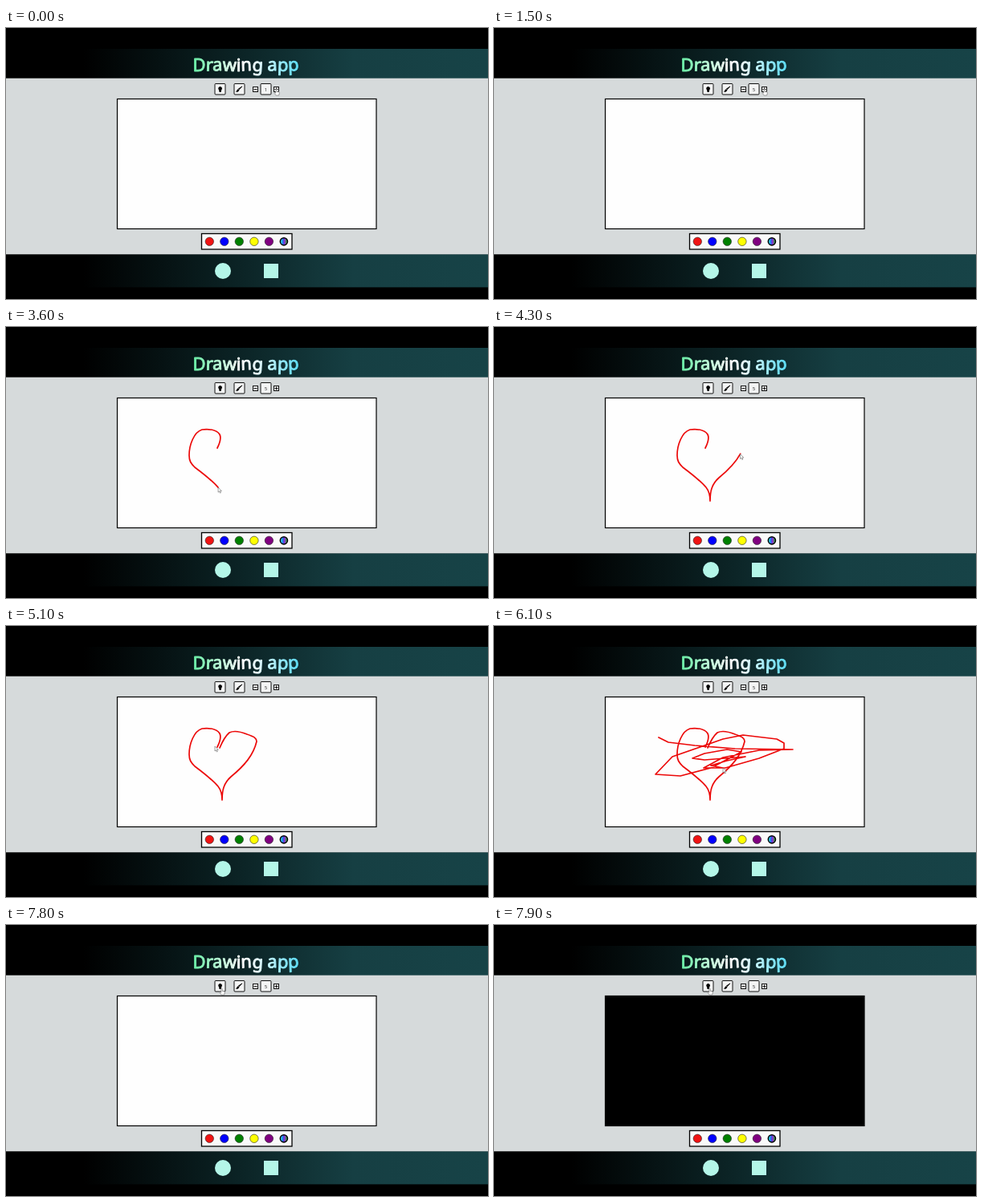
These frames come from a looping animation (600 by 338 pixels, 8000 ms). An HTML page:

```html
<!DOCTYPE html>
<html lang="en">
<head>
<meta charset="utf-8">
<title>Drawing app</title>
<style>
  html, body { margin: 0; width: 100%; height: 100%; overflow: hidden; background: #000; }
  svg { display: block; width: 100%; height: 100%; }
  .title { font: 500 22px "Noto Sans", sans-serif; stroke-width: .9; stroke-linejoin: round; }
  .size { font: 6px "Noto Sans", sans-serif; text-anchor: middle; fill: #333; }
  .button { fill: #f3f4f4; stroke: #111; }
  .ink { fill: none; stroke: #ec0808; stroke-width: 1.7; stroke-linecap: round; stroke-linejoin: round; }
  .dots circle { stroke: #222; stroke-width: .6; }
  .cursor { fill: #fff; stroke: #666; stroke-width: .6; stroke-linejoin: round; }
</style>
</head>
<body>
<svg viewBox="0 0 600 338">
  <defs>
    <linearGradient id="bar">
      <stop offset=".16" stop-color="#000"/>
      <stop offset=".5" stop-color="#0c2527"/>
      <stop offset=".72" stop-color="#163f43"/>
      <stop offset="1" stop-color="#174347"/>
    </linearGradient>
    <radialGradient id="page" gradientUnits="userSpaceOnUse" r="1"
      gradientTransform="translate(300 172) scale(260 420)">
      <stop offset="0" stop-color="#f8f8f8"/>
      <stop offset=".35" stop-color="#efefef"/>
      <stop offset=".7" stop-color="#e2e4e4"/>
      <stop offset="1" stop-color="#d6dadb"/>
    </radialGradient>
    <linearGradient id="shine" gradientUnits="userSpaceOnUse" x1="233" x2="367">
      <stop offset="0" stop-color="#69efa6"/>
      <stop offset=".45" stop-color="#fff"/>
      <stop offset=".6" stop-color="#e6fbff"/>
      <stop offset="1" stop-color="#55dcf5"/>
    </linearGradient>
    <linearGradient id="mix">
      <stop offset=".15" stop-color="#2bd5e8"/>
      <stop offset=".4" stop-color="#2a62f0"/>
      <stop offset=".6" stop-color="#9a2bd0"/>
      <stop offset=".85" stop-color="#3c9a50"/>
    </linearGradient>
  </defs>

  <rect width="600" height="338"/>
  <rect y="26" width="600" height="37" fill="url(#bar)"/>
  <rect y="62.7" width="600" height="220" fill="url(#page)"/>
  <rect y="282.4" width="600" height="41" fill="url(#bar)"/>
  <text class="title" x="232.5" y="53.5" rotate="0 2 -3 2 0 -2 3 0 -2 2 -2"
    fill="url(#shine)" stroke="url(#shine)">Drawing app</text>

  <g class="button">
    <rect x="260" y="69.5" width="13" height="13.5" rx="1"/>
    <rect x="284" y="69.5" width="13" height="13.5" rx="1"/>
    <rect x="317" y="69.5" width="13" height="13.5" rx="1"/>
    <rect x="307.5" y="73.5" width="6" height="6"/>
    <rect x="333.5" y="73.5" width="6" height="6"/>
    <path d="M308.5 76.5h4M334.5 76.5h4M336.5 74.5v4"/>
  </g>
  <path d="M266.6 73a2.5 2.5 0 0 1 1.6 4.3l-.6 2.6h-2l-.6-2.6a2.5 2.5 0 0 1 1.6-4.3z"/>
  <path d="M294 72.8l-3.6 4-1.1-.9zM290 77.3c-.3 2-1.8 2.4-3.4 2.2 1-.7.7-2 1.8-2.8z" stroke="#000" stroke-width=".7"/>
  <text id="size" class="size" x="323.5" y="78.5">1</text>

  <rect id="board" x="138.5" y="88.5" width="322.5" height="162" fill="#fefefe" stroke="#000" stroke-width="1.2"/>
  <g id="drawing" class="ink">
    <path id="heart" d="M263 151C266 145 268 138 266 134C262 128 252 127 244 128C234 131 228 147 228 160
      C228 167 230 170 235 175C247 184 258 193 264 200C268 205 269 211 269 217C269 205 271 196 280 188
      C297 174 308 161 312 144C312 140 309 138 300 135C290 131 282 131 278 133C272 138 269 145 266 152"/>
    <path id="scribble" d="M205 139L217 145 250 149 300 153 372 154 330 155 285 164 261 177 288 177 330 165
      361 153 361 146 352 141 310 136 285 141 222 163 201 185 232 187 270 177 308 157 290 154 262 159
      247 165 262 167 313 163 290 168 270 174 285 177"/>
  </g>

  <rect x="243.5" y="256.5" width="112.5" height="19.5" fill="#fafafa" stroke="#000" stroke-width="1.3"/>
  <g class="dots">
    <circle cx="253.3" cy="266.3" r="5.2" fill="#f01414"/>
    <circle cx="271.8" cy="266.3" r="5.2" fill="#00f"/>
    <circle cx="290.3" cy="266.3" r="5.2" fill="#008000"/>
    <circle cx="308.9" cy="266.3" r="5.2" fill="#ff0"/>
    <circle cx="327.4" cy="266.3" r="5.2" fill="#800080"/>
  </g>
  <circle cx="345.9" cy="266.3" r="4.6" fill="url(#mix)" stroke="#000" stroke-width="1.5"/>

  <circle cx="270" cy="303" r="10" fill="#b4f6e8"/>
  <rect x="321" y="294" width="18" height="18" fill="#b4f6e8"/>

  <g id="cursor" class="cursor">
    <path id="arrow" d="M0 0v6l1.4-1.2 1 2.2 1-.5-1-2.1h1.9z"/>
    <path id="hand" d="M-.7 0q.7-.8 1.4 0v2.7l2.6.6q.6.3.5 1.2l-.6 3h-3.6l-2.1-2.8q0-.9.9-.6l.9.6z"/>
  </g>
</svg>

<script>
  const LOOP = 8000;
  const $ = id => document.getElementById(id);
  const clamp = v => Math.max(0, Math.min(1, v));

  // Interpolates keys of the form [time, ...values].
  function at(keys, t) {
    const i = keys.findIndex(k => k[0] > t);
    if (i === 0) return keys[0].slice(1);
    if (i < 0) return keys[keys.length - 1].slice(1);
    const a = keys[i - 1], b = keys[i];
    const p = clamp((t - a[0]) / (b[0] - a[0]));
    return a.slice(1).map((v, n) => v + (b[n + 1] - v) * p);
  }

  const strokes = [
    { path: $("heart"), keys: [[2650, 0], [3600, .447], [4900, 1]] },
    { path: $("scribble"), keys: [[5200, 0], [5400, .19], [6080, 1]] }
  ];
  for (const s of strokes) {
    s.length = s.path.getTotalLength();
    s.start = s.keys[0][0];
    s.end = s.keys[s.keys.length - 1][0];
    s.path.style.strokeDasharray = `${s.length} ${s.length + 5}`;
  }

  const moves = [
    [0, 336.5, 76.5], [1600, 336.5, 76.5], [2050, 253, 266], [2200, 253, 266],
    [2600, 263, 151], [4900, 266, 152], [5080, 260, 150], [5120, 260, 150], [5200, 205, 139],
    [6080, 285, 177], [6350, 285, 177], [7050, 290.5, 77], [7400, 290.5, 77],
    [7650, 268.5, 79.5], [8000, 268.5, 79.5]
  ];

  function draw(now) {
    const t = now % LOOP;
    let [x, y] = at(moves, t);

    for (const s of strokes) {
      const done = at(s.keys, t)[0] * s.length;
      s.path.style.strokeDashoffset = s.length - done;
      s.path.style.visibility = t > s.start ? "visible" : "hidden";
      if (t > s.start && t < s.end) ({ x, y } = s.path.getPointAtLength(done));
    }

    $("size").textContent = Math.min(5, 1 + Math.floor(t / 300));
    $("drawing").style.display = t < 7300 ? "" : "none";
    $("board").style.fill = t < 7880 ? "#fefefe" : "#000";

    const onBoard = y > 88 && y < 251;
    $("arrow").style.display = onBoard ? "" : "none";
    $("hand").style.display = onBoard ? "none" : "";
    $("cursor").setAttribute("transform", `translate(${x} ${y})`);
  }

  function tick() {
    draw(performance.now());
    requestAnimationFrame(tick);
  }
  tick();
</script>
</body>
</html>
```
